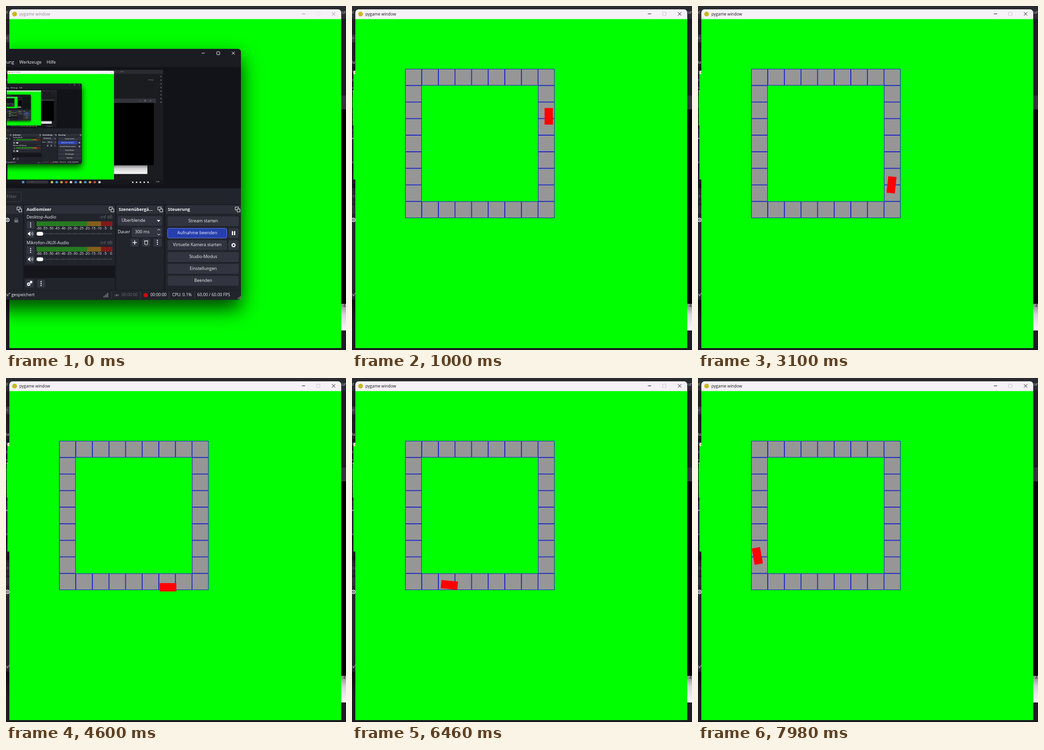
Recreate the animation shown at these times as an HTML page with a canvas. Size 712 by 722 pixels, loop 8000 ms.

```html
<!DOCTYPE html>
<html lang="de">
<head>
<meta charset="utf-8">
<style>
  html, body { margin: 0; width: 100%; height: 100%; overflow: hidden; background: #000; }
  canvas { display: block; }
</style>
</head>
<body>
<canvas width="712" height="722"></canvas>
<script>
const ctx = document.querySelector('canvas').getContext('2d');
const FONT = '"Open Sans", "Noto Sans", sans-serif';
const LOOP = 8000, FOCUS_TIME = 580, TILE = 34.78;
const LIGHT = '#f4f4f8', DIM = '#6e7078', BUTTON = '#32353f', PANEL = '#22242c', HEADER = '#2d3039';

// Car poses: step, centre x, centre y, heading in degrees clockwise from "down".
const POSES = [
  [18, 412, 218.5, 0], [22, 412, 231.5, 0], [67, 405.3, 375.4, 6], [98, 339.3, 439.3, 90],
  [121, 263, 437.2, 95], [155, 155, 420.5, 120], [171, 124.3, 373.5, 170]
];

function box(x, y, w, h, color, radius = 0, border) {
  ctx.beginPath();
  ctx.roundRect(x, y, w, h, radius);
  if (color) { ctx.fillStyle = color; ctx.fill(); }
  if (border) { ctx.strokeStyle = border; ctx.lineWidth = 1; ctx.stroke(); }
}

function text(str, x, y, color = LIGHT, { size = 9, align = 'left', weight = 400 } = {}) {
  ctx.font = `${weight} ${size}px ${FONT}`;
  ctx.textAlign = align;
  ctx.textBaseline = 'middle';
  ctx.fillStyle = color;
  ctx.fillText(str, x, y);
}

function line(points, color = LIGHT, width = 1) {
  ctx.beginPath();
  for (const [x, y] of points) ctx.lineTo(x, y);
  ctx.strokeStyle = color;
  ctx.lineWidth = width;
  ctx.stroke();
}

function polygon(points, color) {
  ctx.beginPath();
  for (const [x, y] of points) ctx.lineTo(x, y);
  ctx.fillStyle = color;
  ctx.fill();
}

function disc(x, y, r, color) {
  ctx.beginPath();
  ctx.arc(x, y, r, 0, 7);
  ctx.fillStyle = color;
  ctx.fill();
}

function ring(x, y, r, color = LIGHT, width = 1, from = 0, to = 7) {
  ctx.beginPath();
  ctx.arc(x, y, r, from, to);
  ctx.strokeStyle = color;
  ctx.lineWidth = width;
  ctx.stroke();
}

function kebab(x, y) {
  for (const d of [-4, 0, 4]) disc(x, y + d, 1.2, LIGHT);
}

function gear(x, y, r = 3.5) {
  ring(x, y, r, LIGHT, 2);
  for (let i = 0; i < 8; i++) {
    const c = Math.cos(i * Math.PI / 4), s = Math.sin(i * Math.PI / 4);
    line([[x + c * r, y + s * r], [x + c * (r + 1.6), y + s * (r + 1.6)]], LIGHT, 1.5);
  }
}

function windowButtons([a, b, c], y, colors, r) {
  line([[a - r, y], [a + r, y]], colors[0]);
  box(b - r, y - r, 2 * r, 2 * r, null, 1, colors[1]);
  line([[c - r, y - r], [c + r, y + r]], colors[2]);
  line([[c + r, y - r], [c - r, y + r]], colors[2]);
}

function drawDesktop() {
  box(-10, 0, 1040, 748, '#1b1c20');
  box(-10, 0, 1040, 27, '#2a2b30');
  text('nt', -4, 14, '#a0a0a8');
  text('ur', 703, 14, '#c4c4cc');
  text('Datei', 745, 14, '#a0a0a8');
  box(-10, 60, 17, 16, '#35373d');
  text('te', -3, 68, '#667799');
  for (let i = 0; i < 8; i++) box(1005, 40 + i * 24, 8, 8, '#5c5d64', 2);
  text('main.py', 925, 68, '#a0a0a8');
  box(702, 188, 274, 29, '#33343a');
  windowButtons([870, 905, 940], 202, [LIGHT, LIGHT, LIGHT], 4);
  box(702, 217, 260, 408, '#000');
  const paper = ctx.createLinearGradient(0, 625, 0, 681);
  paper.addColorStop(0, '#8a8a8c');
  paper.addColorStop(.4, '#d4d4d6');
  paper.addColorStop(1, '#fafafa');
  box(702, 625, 218, 56, paper);
  text('4', 706, 630, '#222');
  box(-10, 719, 1040, 29, '#17181c');
  box(102, 727, 15, 15, '#4c9be0');
  box(128, 724, 145, 20, '#303238', 10);
  text('Suche', 152, 735, DIM);
  const colors = ['#d8c580', '#46a0d0', '#e0a030', '#c85030', '#d8d8d8', '#5588dd'];
  for (let i = 0; i < 11; i++) box(290 + i * 31, 728, 15, 14, colors[i % 6], 3);
  for (let i = 0; i < 5; i++) box(820 + i * 25, 731, 9, 9, LIGHT, 2);
  text('12:00', 975, 735);
}

function drawTrack() {
  for (let row = 0; row < 9; row++) {
    for (let col = 0; col < 9; col++) {
      if (row % 8 && col % 8) continue;
      box(111.7 + col * TILE, 132.4 + row * TILE, TILE - .8, TILE - .8, '#969696', 0, '#1818d0');
    }
  }
}

function carPose(step) {
  const first = POSES[0];
  if (step <= first[0]) return { x: first[1], y: first[2], angle: 0 };
  const i = Math.max(1, POSES.findIndex(p => p[0] >= step));
  const [n0, x0, y0, d0] = POSES[i - 1], [n1, x1, y1, d1] = POSES[i];
  const u = (step - n0) / (n1 - n0), reach = Math.hypot(x1 - x0, y1 - y0);
  const a0 = d0 * Math.PI / 180, a1 = d1 * Math.PI / 180;
  // Cubic Hermite curve whose tangents follow the headings.
  const curve = (p, q, m, k) => [
    p + m * u + (3 * (q - p) - 2 * m - k) * u * u + (2 * (p - q) + m + k) * u ** 3,
    m + 2 * (3 * (q - p) - 2 * m - k) * u + 3 * (2 * (p - q) + m + k) * u * u
  ];
  const [x, dx] = curve(x0, x1, -reach * Math.sin(a0), -reach * Math.sin(a1));
  const [y, dy] = curve(y0, y1, reach * Math.cos(a0), reach * Math.cos(a1));
  return { x, y, angle: Math.atan2(-dx, dy) };
}

function drawGame(active, step) {
  const ink = active ? '#111' : '#8c8a8e';
  box(7, 7, 695, 711, '#00ff00', [7, 7, 0, 0]);
  box(7, 7, 695, 20.5, '#f6f1f7', [7, 7, 0, 0]);
  disc(18, 17, 5, '#c9b820');
  text('pygame window', 28, 17.5, ink, { size: 8.5 });
  windowButtons([623, 654, 686], 16.5, [ink, active ? '#c8c4ca' : '#e6e2e8', ink], 3.5);
  drawTrack();
  const { x, y, angle } = carPose(step);
  ctx.save();
  ctx.translate(x, y);
  ctx.rotate(angle);
  box(-8.7, -17.4, 17.4, 34.8, '#ff0000');
  ctx.restore();
}

function dock(x, w, title) {
  box(x, 418, w, 178, PANEL, 3);
  box(x, 418, w, 18, HEADER, [3, 3, 0, 0]);
  text(title, x + 5, 427.5, LIGHT, { weight: 700 });
  const right = x + w - 7;
  box(right - 5, 422, 7, 6, null, 0, LIGHT);
  box(right - 1, 426, 6, 6, HEADER, 0, LIGHT);
}

function audioChannel(y, name) {
  text(name, 43, y);
  text('-inf dB', 223, y, DIM, { align: 'right' });
  box(43, y + 7, 17, 17, BUTTON, 2);
  kebab(51.5, y + 15.5);
  box(64, y + 8, 106, 10, '#267a20');
  box(170, y + 8, 29, 10, '#80601c');
  box(199, y + 8, 24, 10, '#801a1a');
  for (let i = 0; i <= 12; i++) {
    const x = 69 + i * 12.6;
    text(String(i * 5 - 60), x, y + 23, LIGHT, { size: 7.3, align: 'center' });
    line([[x, y + 17], [x, y + 20]], '#9a9aa2', .6);
    if (i) line([[x, y + 31], [x, y + 36]], '#44464e');
  }
  box(43, y + 26, 17, 17, BUTTON, 2);
  polygon([[46, y + 32], [48, y + 32], [51, y + 29], [51, y + 39], [48, y + 36], [46, y + 36]], LIGHT);
  ring(51, y + 34, 3, LIGHT, 1, -1, 1);
  ring(51, y + 34, 5.5, LIGHT, 1, -1, 1);
  box(64, y + 33, 159, 2, '#3c3f48', 1);
  box(64, y + 30, 14, 8, '#fff', 4);
}

function drawMixer() {
  dock(38, 190, 'Audiomixer');
  audioChannel(444, 'Desktop-Audio');
  audioChannel(497.5, 'Mikrofon-/AUX-Audio');
  box(38, 545, 190, 26, '#15161b');
  box(41, 574, 17, 17, BUTTON, 2);
  box(65, 574, 17, 17, BUTTON, 2);
  gear(47.5, 584, 2.2);
  gear(52.5, 579.5, 1.2);
  kebab(73.5, 582.5);
}

function drawTransitions() {
  dock(231, 99, 'Szenenübergä...');
  box(234, 441, 93, 20, BUTTON, 3);
  text('Überblende', 242, 451);
  polygon([[316, 449], [323, 449], [319.5, 453.5]], LIGHT);
  text('Dauer', 234, 475);
  box(263, 465, 64, 20, BUTTON, 3);
  text('300 ms', 270, 475);
  line([[317, 471], [320, 468], [323, 471]]);
  line([[317, 478], [320, 481], [323, 478]]);
  for (const x of [261, 285, 309]) box(x, 488, 17, 17, BUTTON, 2);
  line([[265, 496.5], [274, 496.5]], LIGHT, 1.5);
  line([[269.5, 492], [269.5, 501]], LIGHT, 1.5);
  box(290.5, 493, 6, 8, null, 1, LIGHT);
  line([[289, 493], [298, 493]]);
  kebab(317, 496);
}

function drawControls() {
  dock(334, 158, 'Steuerung');
  const labels = ['Stream starten', 'Aufnahme beenden', 'Virtuelle Kamera starten',
    'Studio-Modus', 'Einstellungen', 'Beenden'];
  labels.forEach((label, i) => {
    const y = 441.5 + i * 25, split = i === 1 || i === 2, w = split ? 124 : 149;
    box(338.5, y, w, 20.5, i === 1 ? '#263fae' : BUTTON, 3, i === 1 ? '#5f78e0' : null);
    text(label, 338.5 + w / 2, y + 10.2, LIGHT, { align: 'center' });
    if (split) box(465.5, y, 22, 20.5, BUTTON, 3);
  });
  box(473, 472.5, 2.5, 8.5, '#fff');
  box(477.5, 472.5, 2.5, 8.5, '#fff');
  gear(476.5, 502, 3);
}

function drawStatus() {
  box(-60, 597, 552, 19, '#22242c', [0, 0, 6, 6]);
  text('.mkv“ gespeichert', 60, 607, LIGHT, { align: 'right' });
  for (let i = 0; i < 4; i++) box(204 + i * 2.7, 609 - i * 2.5, 2, 2.5 + i * 2.5, DIM);
  disc(232, 607, 2, DIM);
  ring(232, 607, 4, DIM, 1, -.7, .7);
  ring(232, 607, 4, DIM, 1, 2.4, 3.8);
  text('00:00:00', 242, 607, DIM, { size: 8.5 });
  disc(292.5, 607, 4.5, '#c80e0e');
  text('00:00:00', 302.5, 607, LIGHT, { size: 8.5 });
  text('CPU: 0.1%', 348, 607, LIGHT, { size: 8.7 });
  text('60.00 / 60.00 FPS', 400.5, 607, LIGHT, { size: 8.7 });
  for (const x of [221, 281.5, 341.5, 395]) line([[x, 599], [x, 615]], '#3c3f48');
  for (let i = 0; i < 3; i++) for (let j = 0; j <= i; j++) box(490 - j * 2.5, 609 + i * 2.3, 1.2, 1.2, LIGHT);
}

function drawRecorder(active, step, depth) {
  const zoom = .321 ** depth;
  ctx.save();
  ctx.shadowColor = 'rgba(0,0,0,.75)';
  ctx.shadowBlur = 42 * zoom;
  ctx.shadowOffsetY = 19 * zoom;
  box(-60, 90, 552, 526.5, '#1b1c22', 6);
  ctx.restore();
  windowButtons([413, 444.5, 476], 99, [LIGHT, LIGHT, LIGHT], 3.2);
  text('Szenensammlung', 17, 118.5, LIGHT, { align: 'right' });
  text('Werkzeuge', 28, 118.5);
  text('Hilfe', 85, 118.5);
  box(-60, 128, 552, 254, '#121318');

  if (depth < 3) {
    ctx.save();
    ctx.translate(.75, 133.8);
    ctx.scale(.321, .321);
    ctx.beginPath();
    ctx.rect(-3, 0, 1025, 748);
    ctx.clip();
    drawScreen(active, step, depth + 1);
    ctx.restore();
  }

  box(-60, 383, 552, 33, '#22242c');
  box(-30, 390.5, 62, 20, null, 3, '#383b45');
  text('Filter', 1, 400.5, DIM);
  dock(-60, 95, '');
  disc(3, 449, 4.5, LIGHT);
  disc(3, 449, 2.8, PANEL);
  disc(3, 449, 1.5, LIGHT);
  box(17.5, 448.5, 8, 6, DIM, 1);
  ring(21.5, 447.5, 2.5, DIM, 1.2, Math.PI, 2 * Math.PI);
  drawMixer();
  drawTransitions();
  drawControls();
  drawStatus();
}

function drawScreen(gameActive, step, depth = 0) {
  drawDesktop();
  if (gameActive) drawRecorder(gameActive, step, depth);
  drawGame(gameActive, step);
  if (!gameActive) drawRecorder(gameActive, step, depth);
}

// Steps last 20, 100 and 20 ms in turn.
function stepAt(time) {
  const shifted = time + 120, rest = shifted % 140;
  return 3 * Math.floor(shifted / 140) + (rest >= 120 ? 2 : rest >= 100 ? 1 : 0) - 2;
}

let shown = -1;
const start = performance.now();
function render() {
  const time = (performance.now() - start) % LOOP, step = stepAt(time);
  if (step !== shown) {
    shown = step;
    drawScreen(step >= stepAt(FOCUS_TIME), step);
  }
  requestAnimationFrame(render);
}
render();
</script>
</body>
</html>
```
